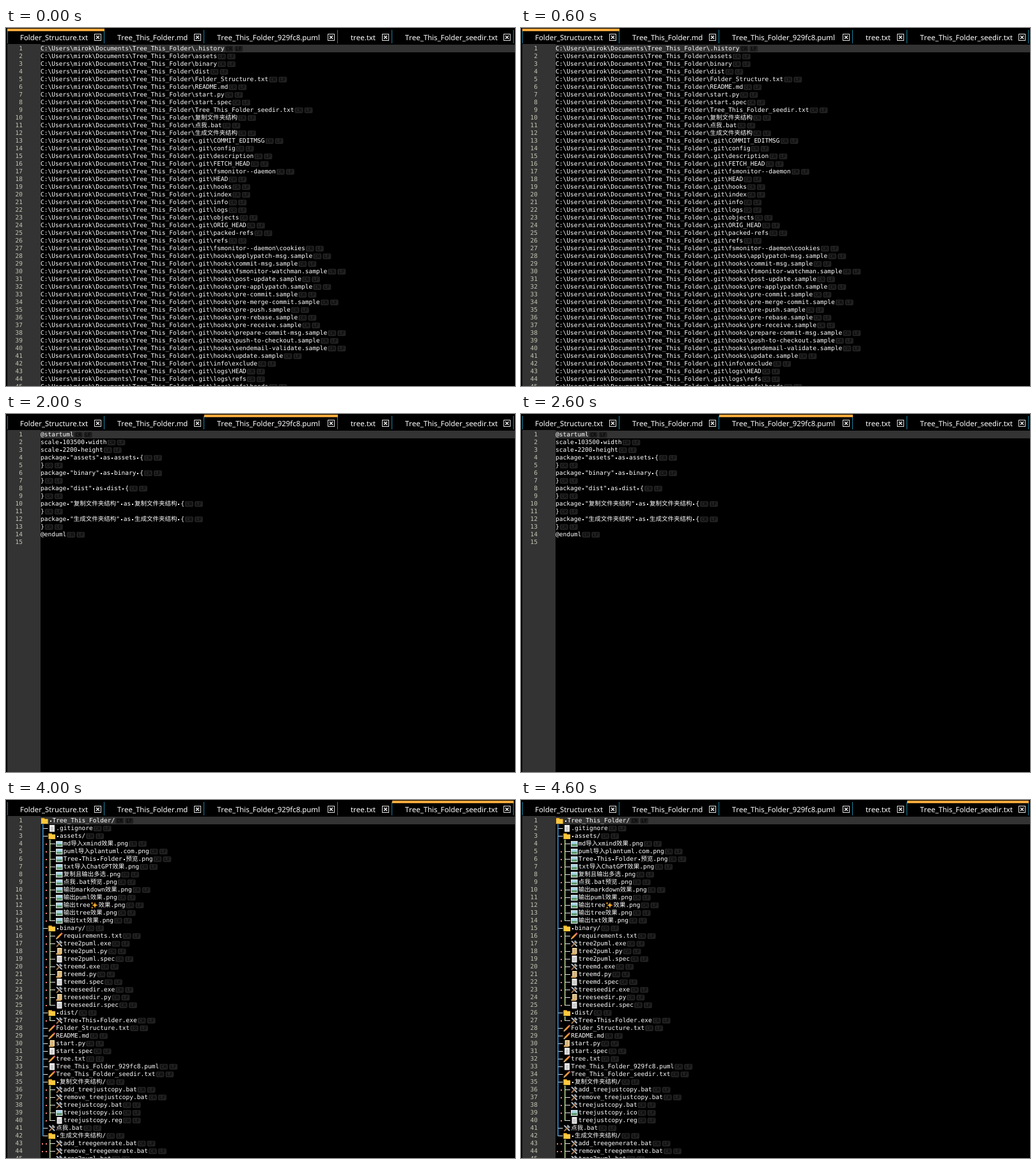
Write an HTML page with a canvas that moves like this. It is 796 px wide and 559 px high and loops after 5000 ms.

```html
<!DOCTYPE html>
<html lang="en">
<head>
<meta charset="utf-8">
<title>Folder tree formats</title>
<style>
html, body { margin: 0; width: 100%; height: 100%; overflow: hidden; background: #000; }
canvas { display: block; }
</style>
</head>
<body>
<canvas id="stage" width="796" height="559"></canvas>
<script>
const ctx = document.getElementById('stage').getContext('2d');
const MONO = '9.55px "DejaVu Sans Mono", "Noto Sans Mono", monospace';
const CJK = '500 9.5px "Noto Sans CJK SC", "Noto Sans CJK", sans-serif';
const UI = '500 11.4px "Noto Sans", "Open Sans", sans-serif';
const CELL = 5.748, ROW = 12, GUTTER = 54, ICON = 12.7, MAX_ROWS = 45;

const words = s => s.trim().split(/\s+/);

// Full paths
const paths = words(`.history assets binary dist Folder_Structure.txt README.md start.py start.spec
  Tree_This_Folder_seedir.txt 复制文件夹结构 点我.bat 生成文件夹结构`);
const gitPaths = words(`COMMIT_EDITMSG config description FETCH_HEAD fsmonitor--daemon HEAD hooks index
  info logs objects ORIG_HEAD packed-refs refs fsmonitor--daemon/cookies`);
const hooks = words(`applypatch-msg commit-msg fsmonitor-watchman post-update pre-applypatch pre-commit
  pre-merge-commit pre-push pre-rebase pre-receive prepare-commit-msg push-to-checkout
  sendemail-validate update`).map(h => h + '.sample');
const pathRows = [
  ...paths,
  ...[...gitPaths, ...hooks.map(h => 'hooks/' + h),
    ...words('info/exclude logs/HEAD logs/refs logs/refs/heads')].map(p => '.git/' + p)
].map(p => ('C:/Users/mirok/Documents/Tree_This_Folder/' + p).replaceAll('/', '\\'));

// Markdown headings
const heads = (level, list) => words(list).map(n => '#'.repeat(level) + ' ' + n);
const mdRows = [
  '# .git',
  ...heads(2, 'COMMIT_EDITMSG FETCH_HEAD HEAD ORIG_HEAD config description fsmonitor--daemon'),
  '### cookies', '## hooks',
  ...hooks.map(h => '### ' + h),
  ...heads(2, 'index info'), '### exclude', '## logs',
  ...heads(3, 'HEAD refs'), '#### heads',
  ...heads(5, 'Test-Actions main tree✨'), '#### remotes', '##### origin',
  ...heads(6, 'HEAD main'), '##### upstream',
  ...heads(6, 'HEAD main'), '#### stash', '## objects', '### 01',
  '#### b181c2b42fd0d0199127eb44b2ee2b86262c36'
];

// PlantUML packages
const umlRows = [
  '@startuml', 'scale 103500 width', 'scale 2200 height',
  ...words('assets binary dist 复制文件夹结构 生成文件夹结构')
    .flatMap(n => [`package "${n}" as ${n} {`, '}']),
  '@enduml', ''
];

// Output of the tree command
const images = ['md导入xmind效果', 'puml导入plantuml.com', 'Tree This Folder 预览', 'txt导入ChatGPT效果',
  '复制且输出多选', '点我.bat预览', '输出markdown效果', '输出puml效果', '输出tree✨效果',
  '输出tree效果', '输出txt效果'].map(n => n + '.png');
const stamped = (prefix, name, day, times, ext) =>
  words(times).map(t => `${prefix}${name}_202401${day}${t}${ext}`);
const deep = '│' + ' '.repeat(10);
const treeRows = [
  'Folder PATH listing', 'Volume serial number is 29D0-96D2', 'C:.',
  ...words(`Folder_Structure.txt README.md start.py start.spec tree.txt Tree_This_Folder_929fc8.puml
    Tree_This_Folder_seedir.txt 点我.bat`).concat('').map(n => '│  ' + n),
  '├─.history',
  ...stamped('│  │  ', '.gitignore', '07', '114443 114642 114753 115028 115038', ''),
  '│  │  ', '│  └─binary',
  ...stamped(deep, 'requirements', '07', '113629 121953 122000 122007', '.txt'),
  ...stamped(deep, 'treeseedir', '03', '201223', '.py'),
  ...stamped(deep, 'treeseedir', '07', `121437 123004 123327 123514 124014 124451 124515 124712
    124906 124940 124951 125024`, '.py'),
  deep, '├─assets',
  ...images.map(n => '│      ' + n)
];

// Icon tree
const iconFor = { png: '🖼', ico: '🖼', txt: '✏', md: '✏', exe: '🛠', bat: '🛠', py: '📜' };
const label = n => n.endsWith('/') ? '📁 ' + n : (iconFor[n.split('.').pop()] || '📄') + n;
const branch = (indent, items) =>
  items.map((n, i) => indent + (i < items.length - 1 ? '├─' : '└─') + label(n));
const seedirRows = [
  label('Tree_This_Folder/'),
  '├─' + label('.gitignore'),
  '├─' + label('assets/'), ...branch('│ ', images),
  '├─' + label('binary/'),
  ...branch('│ ', ['requirements.txt', ...['tree2puml', 'treemd', 'treeseedir']
    .flatMap(n => ['.exe', '.py', '.spec'].map(e => n + e))]),
  '├─' + label('dist/'), ...branch('│ ', ['Tree This Folder.exe']),
  ...words(`Folder_Structure.txt README.md start.py start.spec tree.txt Tree_This_Folder_929fc8.puml
    Tree_This_Folder_seedir.txt`).map(n => '├─' + label(n)),
  '├─' + label('复制文件夹结构/'),
  ...branch('│ ', words(`add_treejustcopy.bat remove_treejustcopy.bat treejustcopy.bat
    treejustcopy.ico treejustcopy.reg`)),
  '├─' + label('点我.bat'),
  '└─' + label('生成文件夹结构/'),
  ...branch('  ', words('add_treegenerate.bat remove_treegenerate.bat tree2puml.bat treemd.bat'))
];

const tabs = [
  { name: 'Folder_Structure.txt', x: 2, end: 154, rows: pathRows },
  { name: 'Tree_This_Folder.md', x: 154, end: 310, rows: mdRows, left: 68 },
  { name: 'Tree_This_Folder_929fc8.puml', x: 310, end: 519, rows: umlRows },
  { name: 'tree.txt', x: 519, end: 604, rows: treeRows, guide: '#eaa23c' },
  { name: 'Tree_This_Folder_seedir.txt', x: 604, end: 794, rows: seedirRows, guide: '#bcd890' }
];

function rect(color, x, y, w, h) {
  ctx.fillStyle = color;
  ctx.fillRect(x, y, w, h);
}

function line(color, width, ...pts) {
  ctx.strokeStyle = color;
  ctx.lineWidth = width;
  ctx.beginPath();
  for (let i = 0; i < pts.length; i += 2) ctx.lineTo(pts[i], pts[i + 1]);
  ctx.stroke();
}

function text(s, x, y, font, color = '#fff', align = 'left') {
  ctx.font = font;
  ctx.fillStyle = color;
  ctx.textAlign = align;
  ctx.fillText(s, x, y);
  return ctx.measureText(s).width;
}

function star(x, y, r) {
  ctx.fillStyle = '#ffb02e';
  ctx.beginPath();
  for (let i = 0; i < 8; i++) {
    const a = i * Math.PI / 4, d = i % 2 ? r * 0.35 : r;
    ctx.lineTo(x + d * Math.cos(a), y + d * Math.sin(a));
  }
  ctx.fill();
}

const icons = {
  '📁'() { rect('#e8a820', 0, 1, 5, 3); rect('#ffc83d', 0, 2.5, 10, 7); },
  '📄'() {
    rect('#eee', 1.5, 0, 7.5, 10);
    for (const y of [3, 5, 7]) rect('#aaa', 3, y, 4.5, 1);
  },
  '🖼'() {
    rect('#e4e8ea', 0, 1, 10, 8.5);
    rect('#a4d4e4', 1, 2, 8, 4);
    rect('#5c9668', 1, 5.5, 8, 3);
  },
  '✏'() {
    line('#f29a38', 2.6, 2, 8, 8, 2);
    line('#e8637a', 2.6, 8, 2, 9.3, 0.7);
    line('#f5d9a8', 1.5, 0.5, 9.5, 2, 8);
  },
  '🛠'() {
    line('#c0c8d0', 1.8, 1, 1, 9, 9);
    line('#a87850', 1.8, 1, 9.5, 7, 3);
    line('#98a4b0', 2.6, 5.5, 1, 9, 4.5);
  },
  '📜'() {
    rect('#f2d9a0', 2, 0, 7, 9);
    rect('#d9a860', 0.5, 7.5, 7, 2.5);
    for (const y of [2, 4, 6]) rect('#a87c48', 3.5, y, 4, 0.8);
  },
  '✨'() { star(6, 5, 4.5); star(1.8, 2, 2); star(2, 8.5, 2); }
};

function drawIcon(key, x, y) {
  ctx.save();
  ctx.translate(x + 1, y - 5);
  ctx.scale(1.06, 1.06);
  icons[key]();
  ctx.restore();
}

function boxPiece(c, x, y, color) {
  const mid = Math.round(x + CELL / 2);
  if (c !== '│') rect('#e6e6e6', c === '─' ? x : mid, y, c === '─' ? CELL : x + CELL - mid, 1);
  if (c !== '─') rect(color, mid, y - 6, 1.5, c === '└' ? 7 : ROW);
}

function badge(s, x, y) {
  ctx.fillStyle = '#202020';
  ctx.beginPath();
  ctx.roundRect(x, y - 4, 13, 9, 2);
  ctx.fill();
  text(s, x + 6.5, y + 3, '7.5px "DejaVu Sans Mono", monospace', '#000', 'center');
}

const TOKEN = /[│├└─ ]|[\u3000-\u9fff]+|[📁📄🖼✏🛠📜✨]|[^│├└─ \u3000-\u9fff📁📄🖼✏🛠📜✨]+/gu;

function drawRow(row, x, y, guide) {
  let indent = true;
  for (const [t] of row.matchAll(TOKEN)) {
    if ('│├└─'.includes(t)) {
      boxPiece(t, x, y, x < GUTTER + 1 ? '#3c98dc' : guide);
      x += CELL;
    } else if (t === ' ') {
      rect(indent ? '#f08078' : '#eee', Math.round(x + 2), y, 2, 2);
      x += CELL;
    } else {
      indent = false;
      if (icons[t]) {
        drawIcon(t, x, y);
        x += ICON;
      } else {
        x += text(t, x, y + 3, t >= '\u3000' ? CJK : MONO);
      }
    }
  }
  return x;
}

function drawTab({ name, x, end }, active) {
  rect('#1b7f9e', end - 1, 3, 1, 21);
  if (active) rect('#faaa3c', x, 1, end - x, 4);
  text(name, x + 20, 19, UI);
  const cx = end - 10.5, cy = 14.5;
  ctx.strokeStyle = '#ddd';
  ctx.lineWidth = 1;
  ctx.strokeRect(cx - 5, cy - 5, 10, 10);
  line('#fff', 1.2, cx - 2.5, cy - 2.5, cx + 2.5, cy + 2.5);
  line('#fff', 1.2, cx + 2.5, cy - 2.5, cx - 2.5, cy + 2.5);
}

function draw(index) {
  const { rows, left = GUTTER, guide } = tabs[index];
  rect('#000', 0, 0, 796, 559);
  rect('#1b7f9e', 2, 3, 1, 21);
  tabs.forEach((tab, i) => drawTab(tab, i === index));
  rect('#333', 2, 25, GUTTER - 2, 534);
  rect('#333', left, 26, 796 - left, ROW);
  rows.slice(0, MAX_ROWS).forEach((row, i) => {
    const y = 32 + i * ROW;
    text(i + 1, 26, y + 3, MONO, '#c4c4b4', 'right');
    const end = drawRow(row, left, y, guide);
    if (row) {
      badge('CR', end + 1, y);
      badge('LF', end + 16, y);
    }
  });
}

ctx.textRendering = 'geometricPrecision';
ctx.fontKerning = 'none';
const start = performance.now();
let shown = -1;

function tick() {
  const index = Math.floor((performance.now() - start) / 1000) % tabs.length;
  if (index !== shown) draw(shown = index);
  requestAnimationFrame(tick);
}
tick();
</script>
</body>
</html>
```
